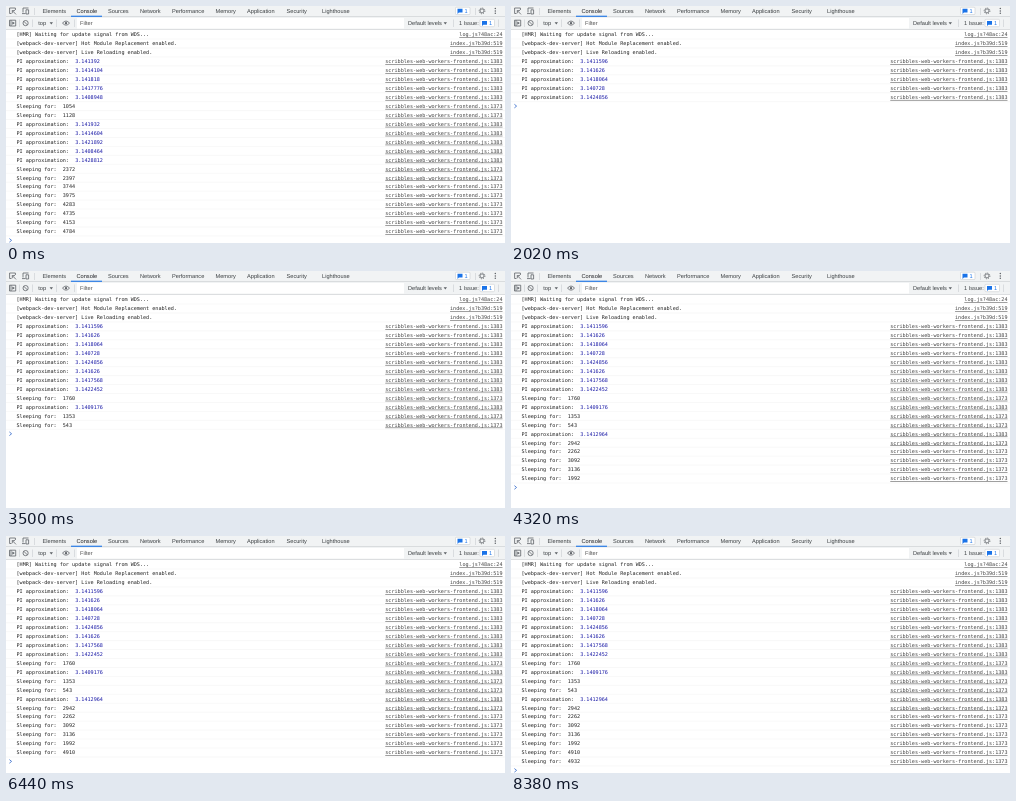
Animation, 499 px wide and 237 px high, one loop 8400 ms. Source, as an HTML page:

```html
<!DOCTYPE html>
<html lang="en">
<head>
<meta charset="utf-8">
<title>Console log</title>
<style>
  html, body { margin: 0; width: 100%; height: 100%; overflow: hidden; background: #fff; }
  svg { display: block; width: 499px; height: 237px; }
  text { white-space: pre; text-rendering: geometricPrecision; font: 5.65px "Liberation Sans", Arial, sans-serif; fill: #3c4043; }
  #log text, #log tspan { font: 5.13px "DejaVu Sans Mono", Menlo, monospace; fill: #222; }
  #log .num { fill: #1a1aa6; }
  #log .link { text-anchor: end; text-decoration: underline; fill: #444; }
  .icon { fill: none; stroke: #5f6368; stroke-width: .8; }
  .rule { stroke: #cacdd1; stroke-width: .6; }
  .solid { fill: #5f6368; }
  .blue { fill: #1a73e8; }
  .badge text { fill: #1a73e8; }
</style>
</head>
<body>
<svg viewBox="0 0 499 237">
  <rect width="499" height="23.5" fill="#f1f3f4"/>
  <rect x="71" y="12" width="327" height="10.5" fill="#fff"/>
  <path class="rule" d="M0 10.5H499M0 23.5H499M28.5 2V9M469.5 2V9M13.5 13.5V21M26.5 13.5V21M50.5 13.5V21M68.5 13.5V21M447.5 13.5V21M492.5 13.5V21"/>
  <rect class="blue" x="65" y="9.7" width="31" height="1.1"/>

  <!-- main toolbar icons -->
  <path class="icon" d="M5.5 7.5H3.6V2H9.4V4M6.3 4.6L10 8.4M6.3 7.2V4.6H9"/>
  <path class="icon" d="M17 6.5V2H22.5M16 7.6H19.5M20 3.8H22.6V8H20Z"/>
  <circle class="icon" cx="476" cy="4.9" r="2" stroke-width="1.2"/>
  <circle class="icon" cx="476" cy="4.9" r="2.9" stroke-dasharray="1.1 1.18"/>
  <g class="solid">
    <circle cx="489.3" cy="2.5" r=".75"/><circle cx="489.3" cy="4.9" r=".75"/><circle cx="489.3" cy="7.3" r=".75"/>
  </g>

  <!-- console toolbar icons -->
  <path class="icon" d="M3.5 14.2H9.7V20H3.5ZM5 14.2V20"/>
  <path class="solid" d="M6.3 15.4L8.8 17.1L6.3 18.8Z"/>
  <circle class="icon" cx="19.6" cy="17.1" r="2.6"/>
  <path class="icon" d="M17.8 15.3L21.4 18.9"/>
  <path class="icon" d="M56.5 17.1Q60 13 63.5 17.1Q60 21.2 56.5 17.1Z"/>
  <circle class="solid" cx="60" cy="17.1" r="1.2"/>
  <path class="solid" d="M43.6 16.2H47L45.3 18.5ZM437.6 16.2H441L439.3 18.5Z"/>

  <g id="labels"></g>
  <g id="log"></g>
</svg>
<script>
const LOOP = 8400, ROW = 8.95, FIRST = 30.3;
const byId = id => document.getElementById(id);
const text = (x, y, s, attrs = "") => `<text x="${x}" y="${y}" ${attrs}>${s}</text>`;

const tabs = [["Elements", 36.5], ["Console", 70.5], ["Sources", 102], ["Network", 134], ["Performance", 166],
  ["Memory", 209.5], ["Application", 241], ["Security", 280.5], ["Lighthouse", 316]];
const badge = (x, y) => `<g class="badge"><rect x="${x}" y="${y}" width="14.5" height="7.4" rx="1" fill="#fff" stroke="#cacdd1" stroke-width=".6"/>
  <path class="blue" d="M${x + 2} ${y + 1.6}h5v3.8h-3.6l-1.4 1.3z"/>${text(x + 9, y + 5.7, 1)}</g>`;

byId("labels").innerHTML =
  tabs.map(([name, x]) => text(x, 6.8, name, name === "Console" ? 'style="fill:#202124"' : "")).join("") +
  text(32.3, 19, "top") + text(74, 19, "Filter", 'style="fill:#555"') +
  text(402, 19, "Default levels") + text(453, 19, "1 Issue:") +
  badge(449.5, 1.2) + badge(474, 13.3);

const boot = [
  ["[HMR] Waiting for update signal from WDS...", "log.js?48ac:24"],
  ["[webpack-dev-server] Hot Module Replacement enabled.", "index.js?b39d:519"],
  ["[webpack-dev-server] Live Reloading enabled.", "index.js?b39d:519"],
];
const script = "scribbles-web-workers-frontend.js:";
// Values with a decimal point are PI results, the others are sleep times.
const entry = v => v.includes(".")
  ? [`PI approximation:  <tspan class="num">${v}</tspan>`, script + 1383]
  : [`Sleeping for:  ${v}`, script + 1373];

const previous = ("3.141392 3.1414104 3.141818 3.1417776 3.1408948 1054 1128 3.141932 3.1414604 3.1421892 " +
  "3.1408464 3.1428812 2372 2397 3744 3975 4283 4735 4153 4784").split(" ");
const CLEAR = 440, BOOT = 760;
const arrivals = [
  [1240, "3.1411596"], [1260, "3.141626"], [1280, "3.1418064"], [1300, "3.140728"], [1340, "3.1424856"],
  [2100, "3.141626"], [2140, "3.1417568"], [2200, "3.1422452"],
  [3000, "1760"], [3060, "3.1409176"], [3200, "1353"], [3400, "543"],
  [3620, "3.1412964"], [4000, "2942"], [4060, "2262"], [4160, "3092"], [4200, "3136"], [4260, "1992"],
  [6200, "4910"], [8060, "4932"],
];

function rowsAt(t) {
  if (t < CLEAR) return [...boot, ...previous.map(entry)];
  if (t < BOOT) return [];
  return [...boot, ...arrivals.filter(a => a[0] <= t).map(a => entry(a[1]))];
}

let shown;
function frame(now) {
  const rows = rowsAt(now % LOOP);
  const y = FIRST + rows.length * ROW - 1.8;
  const html = rows.map(([message, link], i) => {
    const base = FIRST + i * ROW, line = base + 2.7;
    return `<path d="M0 ${line}H499" stroke="#f0f0f0" stroke-width=".5"/>` +
      text(10.5, base, message) + text(496.5, base, link, 'class="link"');
  }).join("") + `<path d="M3.4 ${y - 1.8}L5.6 ${y}L3.4 ${y + 1.8}" fill="none" stroke="#4778d0" stroke-width=".9"/>`;
  if (html !== shown) byId("log").innerHTML = shown = html;
  requestAnimationFrame(frame);
}
frame(performance.now());
</script>
</body>
</html>
```
